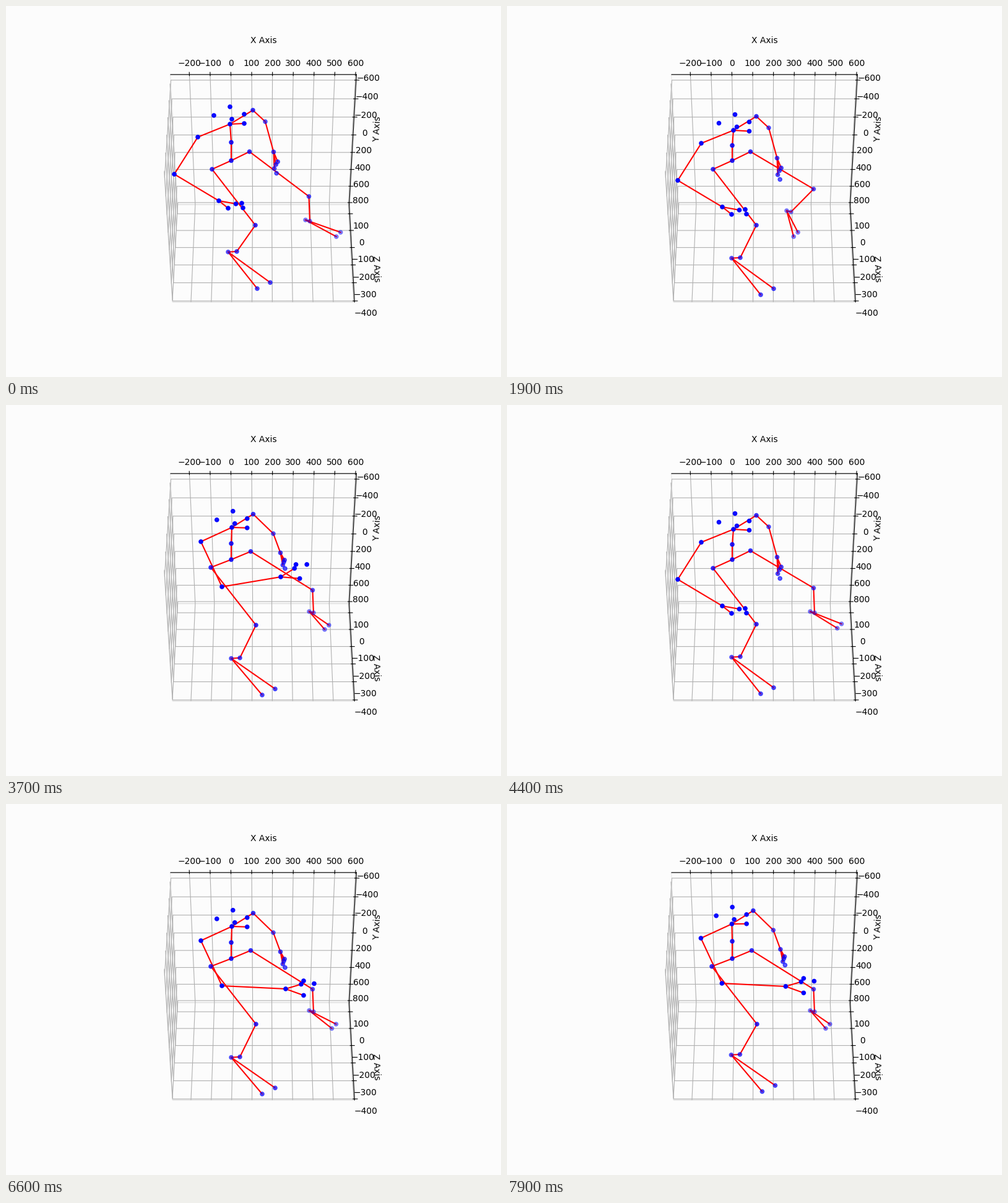
Animation, 800 px wide and 600 px high, one loop 8 s. Source, as a matplotlib script:

```python
import numpy as np
import matplotlib.pyplot as plt
from matplotlib.animation import FuncAnimation
from matplotlib.collections import LineCollection

FRAMES, STEP = 80, 100
PAPER = "#fcfcfc"

plt.rcParams["font.family"] = "DejaVu Sans"
fig = plt.figure(figsize=(8, 6), dpi=100, facecolor=PAPER)

# Empty 3D box seen from below
box = fig.add_subplot(111, projection="3d", facecolor=PAPER)
box.view_init(elev=-45, azim=-89.99)
box.set(xlim=(-290.5, 604.5), ylim=(-659, 825), zlim=(-406, 155.6),
        xlabel="X Axis", ylabel="Y Axis", zlabel="Z Axis")
for axis in (box.xaxis, box.yaxis, box.zaxis):
    axis.set_pane_color(PAPER)
    axis.pane.set_edgecolor("#dedede")

# Flat layer in stage pixels for the figure
ax = fig.add_axes([0, 0, 1, 1])
ax.set(xlim=(0, 800), ylim=(600, 0))
ax.axis("off")

# Joint: place with the right arm out, then its shift when the arm swings in
JOINTS = {
    "neck": (366, 201, -1, -3),
    "sh_r": (314, 222, 1, -1),
    "elbow_r": (276, 282, 73, 12),
    "wrist_r": (348, 325, 96, -47),
    "sh_l": (403, 178.5, -3.5, -2),
    "elbow_l": (423, 197, 9, 11),
    "wrist_l": (436.5, 246, 7, -7),
    "hip_r": (333, 264, -2, -1.3),
    "knee_r": (403, 354.5, 1, 1.5),
    "ankle_r": (377, 407, 1, 2),
    "toe_r": (410, 467, 4, 2),
    "knee_l": (495.5, 296, 0, 3.5),
    "ankle_l": (497, 336, 0, 0),
    "toe_l": (515, 361, 0, 2),
}
# Right fingers relative to the wrist, in the same form
FINGERS = {
    "f1": (27.5, 5, -2.5, -12.5),
    "f2": (15, 12, 14, -1.5),
    "f3": (37, 4, -8, -17),
    "f4": (39, 11.5, 7, -20),
}
HEAD = [(2, -26), (-24, -12), (5, -6), (25, -14), (25, 1)]
RAISED = "neck sh_r elbow_r wrist_r sh_l elbow_l wrist_l ankle_r toe_r".split()
LOWERED = "knee_l ankle_l toe_l".split()

CHAINS = [
    "pelvis spine neck head4", "neck sh_r elbow_r wrist_r f1", "wrist_r f2",
    "neck sh_l elbow_l wrist_l g1", "wrist_l g2", "wrist_l g3",
    "pelvis hip_r knee_r ankle_r heel_r toe_r", "heel_r tip_r",
    "pelvis hip_l knee_l ankle_l heel_l toe_l", "heel_l tip_l",
]
BONES = [pair for c in CHAINS for pair in zip(c.split(), c.split()[1:])]

# Opacity by depth, farthest first
SHADE = {
    0.42: "toe_l tip_l heel_l ankle_l",
    0.58: "knee_l elbow_l heel_r",
    0.64: "wrist_l g1 g2 g3 g4 ankle_r toe_r tip_r",
    0.72: "hip_l hip_r knee_r sh_l",
    0.82: "pelvis spine",
    0.95: "neck sh_r head0 head1 head2 head3 head4",
    1.0: "elbow_r wrist_r f1 f2 f3 f4",
}
DOTS = [(n, a) for a, names in SHADE.items() for n in names.split()]


def smooth(t, start, end):
    u = np.clip((t - start) / (end - start), 0, 1)
    return u * u * (3 - 2 * u)


def bump(t, centre, width):
    return np.exp(-((t - centre) / width) ** 2)


def blend(spec, u):
    x, y, dx, dy = spec
    return np.array([x + dx * u, y + dy * u])


def joints(t):
    beat = t % 2580
    arm = smooth(beat, 0, 160) - smooth(beat, 1450, 1800)
    reach = arm * smooth(t, 5700, 6600)
    step = (1 - np.cos(2 * np.pi * (t - 3700) / 1050)) / 2
    kick = bump(t, 1900, 220)
    lift = bump(t, 0, 500) + 0.4 * smooth(t, 6600, 7900)

    p = {k: blend(v, arm) for k, v in JOINTS.items()}
    for k in RAISED:
        p[k] += np.array([-4, -10]) * lift
    for k in LOWERED:
        p[k] += np.array([-6, 12]) * lift * (1 - reach)
    p["wrist_r"] += np.array([8, 21]) * reach
    p["ankle_l"] += np.array([-38, -3]) * kick
    p["toe_l"] += np.array([25 * step - 67 * kick, 12 * kick])

    p["pelvis"] = np.array([364, 250])
    p["spine"] = np.array([364, 250 + 0.5 * (p["neck"][1] - 250)])
    p["hip_l"] = np.array([726.5, 499.6]) - p["hip_r"]
    sway = 0.25 * (p["neck"][1] - 199)
    for k, off in enumerate(HEAD):
        p[f"head{k}"] = p["neck"] + off + sway

    # The right hand tips up while the arm is in
    a = np.radians(-15) * (arm - reach)
    turn = np.array([[np.cos(a), -np.sin(a)], [np.sin(a), np.cos(a)]])
    for k, v in FINGERS.items():
        p[k] = p["wrist_r"] + turn @ blend(v, arm)

    # The left fingers fan out from thumb to palm
    dx, dy = blend((4.7, 34.5, 2.8, -9), arm)
    fan = [(6.7, 0.46 * dy), (0.6 * dx + 1, 0.59 * dy), (dx - 3.6, 0.78 * dy), (dx, dy)]
    for k, off in enumerate(fan, 1):
        p[f"g{k}"] = p["wrist_l"] + off

    p["heel_r"] = p["ankle_r"] + (-14, 0.8)
    p["tip_r"] = p["toe_r"] + (21, -9.8)
    p["heel_l"] = p["ankle_l"] + (-7, -2)
    p["tip_l"] = p["toe_l"] + (6.9, -7)
    return p


bones = LineCollection([], colors="red", linewidths=1.5, capstyle="projecting", zorder=4)
ax.add_collection(bones)
dots = ax.scatter(np.zeros(len(DOTS)), np.zeros(len(DOTS)), s=20,
                  c=[(0, 0, 1, a) for _, a in DOTS], zorder=5)


def update(i):
    p = joints(i * STEP)
    bones.set_segments([(p[a], p[b]) for a, b in BONES])
    dots.set_offsets([p[n] for n, _ in DOTS])
    return bones, dots


anim = FuncAnimation(fig, update, frames=FRAMES, interval=STEP, repeat=True,
                     repeat_delay=0, blit=False)
plt.show()
```
